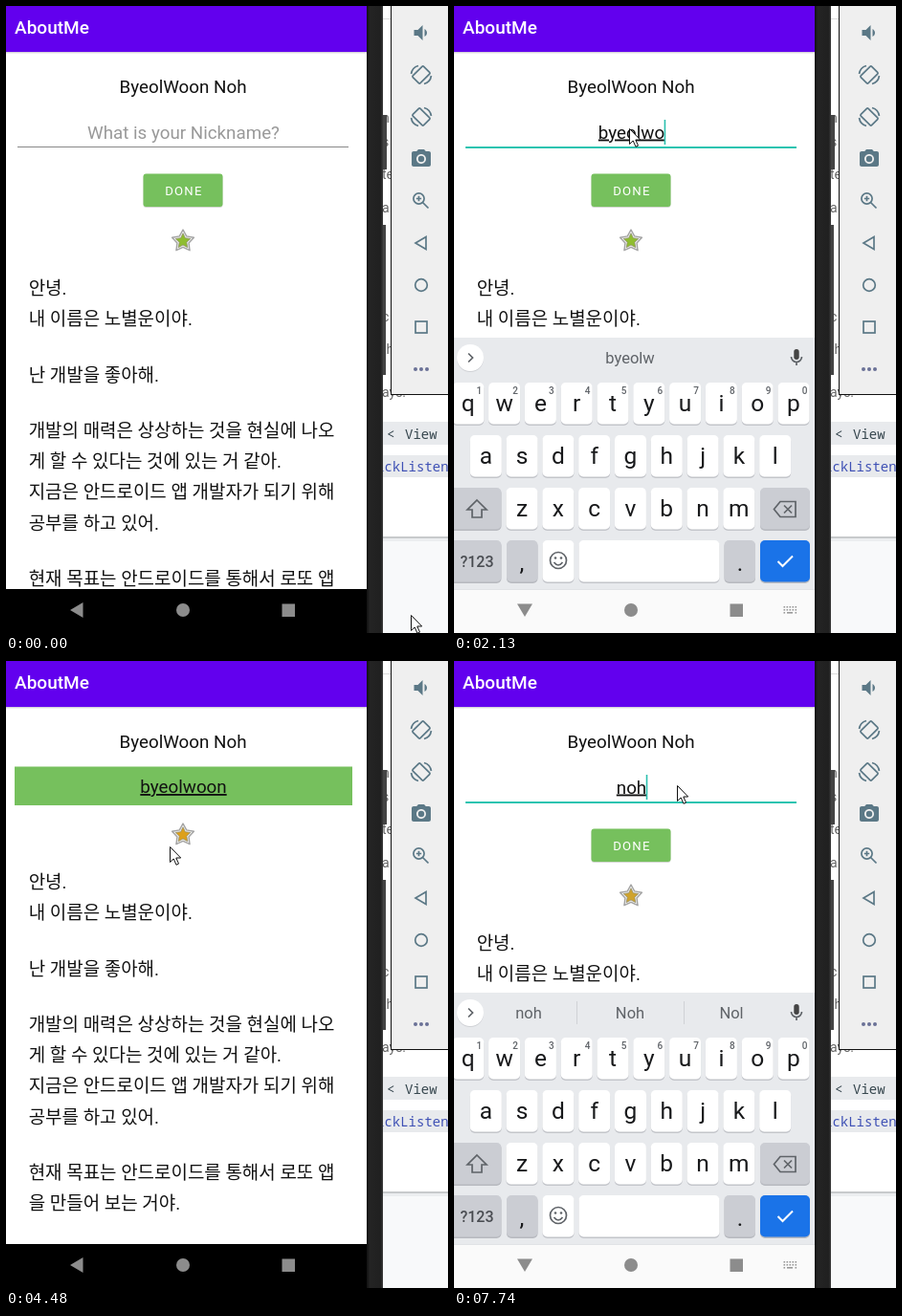
An HTML page that plays this animation: 462 by 656 pixels, repeating every 8 s.

```html
<!DOCTYPE html>
<html lang="ko">
<head>
<meta charset="utf-8">
<title>AboutMe</title>
<style>
  html, body { margin: 0; width: 100%; height: 100%; overflow: hidden; background: #fff; }
  svg { display: block; width: 462px; height: 656px; }
  text { font: 18.8px Roboto, 'Noto Sans CJK KR', 'Noto Sans CJK', sans-serif; fill: #111; white-space: pre; }
  .mid { text-anchor: middle; }
  .body { font-size: 18.95px; }
  .composing { text-decoration: underline; text-decoration-thickness: 1px; text-decoration-skip-ink: none; }
  .key { font-size: 24.5px; fill: #18191b; }
  .small { font-size: 10px; font-weight: 500; fill: #5f6368; }
  .word { font-size: 16.5px; fill: #5f6368; }
  .code { font: 500 14px 'Noto Sans Mono', monospace; fill: #37474f; }
  .doc { font-size: 14px; fill: #666; }
  .line { fill: none; stroke: #5f6368; stroke-width: 1.7; }
  .tool { fill: #5b7886; }
  .toolLine { fill: none; stroke: #5b7886; stroke-width: 1.7; }
</style>
</head>
<body>
<svg id="stage" viewBox="0 0 462 656"></svg>
<script>
const LOOP = 8000;
const NICK = 'byeolwoon';
const part = n => NICK.slice(0, n);

// Timelines: [start in ms, value]
const TEXT = [
  [0, ''], [1570, part(1)], [1700, part(2)], [1840, part(3)], [1900, part(4)], [1970, part(5)],
  [2060, part(6)], [2130, part(7)], [2260, part(8)], [2330, NICK],
  [6060, part(8)], [6340, part(7)], [6430, part(6)], [6510, part(5)], [6590, part(3)],
  [6670, part(1)], [6750, ''], [7210, 'n'], [7540, 'no'], [7740, 'noh']
];
const WORDS = [
  [0, null], [1640, ['b', 'B', 'by']], [1770, ['by', 'By', 'bye']], [1900, [part(4)]],
  [1970, [part(5)]], [2130, [part(6)]], [2330, [part(7)]], [2530, [NICK]],
  [6430, [part(7)]], [6510, [part(5)]], [6590, [part(3)]], [6670, [part(1)]], [6750, null],
  [7280, ['n', 'N', 'no']], [7540, ['no', 'No', 'not']], [7740, ['noh', 'Noh', 'Nol']]
];
const CARET = [
  [0, 0], [900, 1], [1310, 0], [1570, 1], [2990, 0], [3490, 1], [3940, 0],
  [5310, .6], [5450, 1], [5930, 0], [6060, 1]
];
const POINTER = [
  [70, 423, 637], [780, 183, 128], [3360, 183, 128], [3600, 165, 200],
  [4360, 165, 200], [5040, 233, 130], [LOOP, 233, 130]
];

const clamp = v => Math.max(0, Math.min(1, v));
const at = (list, t) => list.filter(e => e[0] <= t).pop()[1];
const smooth = p => p * p * (3 - 2 * p);

const rect = (x, y, w, h, fill, more = '') =>
  `<rect x="${x}" y="${y}" width="${w}" height="${h}" fill="${fill}" ${more}/>`;
const text = (x, y, s, cls = '', more = '') => `<text x="${x}" y="${y}" class="${cls}" ${more}>${s}</text>`;
const path = (d, cls = 'line', more = '') => `<path d="${d}" class="${cls}" ${more}/>`;
const group = (id, body, more = '') => `<g id="${id}" ${more}>${body}</g>`;
const icon = (x, y, scale, d) =>
  path(d, 'tool', `transform="translate(${x} ${y}) scale(${scale}) translate(-12 -12)"`);

function starPoints(outer, inner) {
  return Array.from({ length: 10 }, (_, i) => {
    const r = i % 2 ? inner : outer, a = i * Math.PI / 5 - Math.PI / 2;
    return `${(r * Math.cos(a)).toFixed(2)},${(r * Math.sin(a)).toFixed(2)}`;
  }).join(' ');
}

function documentPage() {
  const snippets = [[122, 'n'], [147, 's'], [181, 'te'], [216, 'a'], [330, 'c'], [364, 'th'], [409, 'ays.']];
  return rect(394, 0, 68, 556, '#fff') + rect(394, 13, 10, 1, '#ddd')
    + rect(394, 556, 68, 100, '#f8f9fa') + rect(394, 555, 68, 2, '#c8cacc') + rect(394, 557, 68, 3, '#eceef0')
    + snippets.map(([y, s]) => text(393, y, s, 'doc')).join('')
    + rect(394, 435, 68, 24, '#e8eaed') + text(398, 452.5, '&lt;', 'code') + text(417, 452.5, 'View', 'code')
    + rect(394, 470, 68, 23, '#e8eaed') + text(387, 486.5, 'ickListen', 'code', 'style="fill:#3f51b5"');
}

function emulatorPanel() {
  const rotate = flip => `<g transform="translate(434 ${flip > 0 ? 72 : 116}) scale(${flip} 1)" class="toolLine">
    <rect x="-5.5" y="-8" width="11" height="16" rx="1.2" transform="rotate(45)"/>
    <path d="M-10.5-1A10.5 10.5 0 0 1-3-9.5M10.5 1A10.5 10.5 0 0 1 3 9.5"/></g>`;
  return rect(402, -2, 62, 409, '#111') + rect(403, -2, 60, 408, '#efefef')
    + icon(433.5, 28, 1, 'M18.5 12c0-1.77-1.02-3.29-2.5-4.03v8.05c1.48-.73 2.5-2.25 2.5-4.02zM5 9v6h4l5 5V4L9 9H5z')
    + rotate(1) + rotate(-1)
    + icon(434, 160, 1, 'M9 2L7.17 4H4c-1.1 0-2 .9-2 2v12c0 1.1.9 2 2 2h16c1.1 0 2-.9 2-2V6c0-1.1-.9-2-2-2h-3.17L15 2H9zm3 15c-2.76 0-5-2.24-5-5s2.24-5 5-5 5 2.24 5 5-2.24 5-5 5z')
    + '<circle cx="434" cy="160" r="3.2" class="tool"/>'
    + '<circle cx="431.5" cy="201.5" r="5.6" class="toolLine"/>'
    + path('M435.5 205.5L441.5 211.5M428.8 201.5H434.2M431.5 198.8V204.2', 'toolLine')
    + path('M428 248L439 241.5V254.5Z', 'toolLine')
    + '<circle cx="434" cy="292" r="6.3" class="toolLine"/>'
    + '<rect x="428" y="330" width="12" height="12" class="toolLine"/>'
    + [428, 434, 440].map(x => `<circle cx="${x}" cy="380" r="2" fill="#6a7196"/>`).join('');
}

function appContent() {
  const body = [
    [301, '안녕.'], [333, '내 이름은 노별운이야.'], [392, '난 개발을 좋아해.'],
    [450, '개발의 매력은 상상하는 것을 현실에 나오'], [482, '게 할 수 있다는 것에 있는 거 같아.'],
    [514, '지금은 안드로이드 앱 개발자가 되기 위해'], [547, '공부를 하고 있어.'],
    [605, '현재 목표는 안드로이드를 통해서 로또 앱'], [637, '을 만들어 보는 거야.']
  ];
  const star = `<g transform="translate(185 246)" stroke-linejoin="round">
    <polygon points="${starPoints(12, 6.4)}" fill="#f0f0f0" stroke="#a4a4a4" stroke-width="1.4"/>
    <polygon id="star" points="${starPoints(8.2, 4)}" stroke="#8b8a6c" stroke-width=".7"/></g>`;
  return rect(0, 0, 377, 656, '#fff') + rect(0, 48, 377, 1, '#d5d1dc') + rect(0, 49, 377, 1, '#f1f1f1')
    + rect(0, 0, 377, 48, '#6200ee')
    + text(9, 29, 'AboutMe', '', 'style="fill:#fff;font-weight:500;font-size:19px"')
    + text(185, 90.5, 'ByeolWoon Noh', 'mid')
    + group('editor',
        text(185.5, 138.5, 'What is your Nickname?', 'mid', 'id="hint" style="fill:#999"')
        + text(185.5, 138.5, '', 'mid composing', 'id="field"')
        + rect(12, 147, 346, 1, '#888', 'id="fieldLine"')
        + rect(0, 119, 1.6, 26, '#2bbfae', 'id="caret"')
        + rect(143.5, 176.5, 83, 34.5, '#d5d8d3', 'rx="3"')
        + rect(143.5, 175.5, 83, 34.5, '#76c05d', 'rx="3" id="button"')
        + text(166.3, 197.5, 'DONE', '', 'style="fill:#fff;font-size:13.2px;letter-spacing:1.17px"'))
    + group('result', rect(9, 110.5, 353, 40.5, '#76c05d') + text(185.5, 138, NICK, 'mid composing'))
    + group('below', star + body.map(([y, s]) => text(23.7, y + 1, s, 'body')).join(''));
}

function key(center, top, width, label, hint = '') {
  return rect(center - width / 2, top + 1, width, 44, '#c3c5ca', 'rx="5"')
    + rect(center - width / 2, top, width, 43.5, '#fff', 'rx="5"')
    + text(center, top + 30, label, 'key mid') + text(center + 11.5, top + 12, hint, 'small mid');
}
const greyKey = (x, top, w, fill = '#cbcdd3') =>
  rect(x, top + 1, w, 44, '#b7b9bf', 'rx="5"') + rect(x, top, w, 43.5, fill, 'rx="5"');

function keyboard() {
  const row = (letters, first, top, hints = '') =>
    [...letters].map((c, i) => key(first + i * 37.8, top, 33, c, hints[i])).join('');
  const mic = '<rect x="355.3" y="359" width="5.4" height="11" rx="2.7" fill="#444"/>'
    + path('M352.5 367A5.5 5.5 0 0 0 363.5 367M358 372.5V376');
  const tools = '<circle cx="66.5" cy="366.5" r="5" class="line"/>' + path('M70 370L76 376')
    + path('M131 368V363Q131 361 129 361H118Q116 361 116 363V373Q116 375 118 375H124ZM124 375V370Q124 368 126 368H131M119.5 369Q121 372 124 371')
    + '<circle cx="120.5" cy="365.5" r="1" fill="#5f6368"/><circle cx="126.5" cy="365.5" r="1" fill="#5f6368"/>'
    + text(178, 372, 'GIF', 'mid', 'style="font-size:12.5px;font-weight:700;fill:#5f6368"')
    + path('M230 361.5H227.5V376H241V361.5H238.5M231 360H237.5V364H231ZM230.5 368H238M230.5 372H236')
    + rect(267.5, 358, 1, 20, '#d0d2d6')
    + [296, 302, 308].map(x => `<circle cx="${x}" cy="368" r="1.8" fill="#5f6368"/>`).join('');
  const words = [78, 184, 290].map((x, i) => text(x, 374, '', 'word mid', `id="word${i}"`)).join('')
    + group('dividers', rect(128, 356, 1, 24, '#d0d2d6') + rect(240, 356, 1, 24, '#d0d2d6'));
  return rect(0, 347, 377, 265, '#e8eaed')
    + '<circle cx="17" cy="369" r="14" fill="#cfd1d5"/><circle cx="17" cy="368" r="14" fill="#fff"/>'
    + path('M-2-4.5L2.5 0L-2 4.5', 'line', 'id="chevron"')
    + group('tools', tools) + group('words', words) + mic
    + row('qwertyuiop', 14.8, 394, '1234567890') + row('asdfghjkl', 33.3, 449)
    + greyKey(-5, 504, 54.5) + path('M24 517L34 527H29V535H19V527H14Z') + row('zxcvbnm', 71, 504)
    + greyKey(320, 504, 52)
    + path('M341 518.5H357V534.5H341L334.5 526.5ZM345 522.5L353 530.5M353 522.5L345 530.5')
    + greyKey(-5, 559, 54.5) + text(24, 586.5, '?123', 'mid', 'style="font-size:16px;font-weight:500;fill:#4a4d52"')
    + greyKey(55, 559, 32.5) + text(71, 591, ',', 'key mid')
    + key(109, 559, 33, '') + '<circle cx="109" cy="580" r="8.5" class="line"/>'
    + '<circle cx="106" cy="577.5" r="1.3" fill="#5f6368"/><circle cx="112" cy="577.5" r="1.3" fill="#5f6368"/>'
    + path('M104.5 582Q109 588 113.5 582')
    + key(204, 559, 147, '')
    + greyKey(282.5, 559, 32.5) + text(299, 591, '.', 'key mid')
    + greyKey(320, 559, 52, '#1a73e8')
    + path('M338.5 581L343.5 586L354 575.5', 'line', 'style="stroke:#fff;stroke-width:2"');
}

function navigation() {
  const keys = [0, 1, 2].flatMap(r => [0, 1, 2, 3, 4].map(c =>
    r === 2 && c % 4 ? '' : rect(344.5 + c * 3, 628 + r * 3, 1.6, 1.6, '#999'))).join('');
  return rect(0, 610, 377, 46, '#000')
    + group('navLight', rect(0, 610, 377, 46, '#fafafa') + rect(0, 610, 377, 1, '#e1e3e6'))
    + '<path id="back" d="M-7 0L6.5-8V8Z" fill="#8c8c8c"/>'
    + '<circle cx="185" cy="632" r="7" fill="#8c8c8c"/>' + rect(288.5, 625.5, 13.5, 13.5, '#8c8c8c')
    + group('imeIcon', keys + rect(348, 634, 6, 1.6, '#999'));
}

const stage = document.getElementById('stage');
stage.innerHTML = `<defs><clipPath id="screen"><rect width="377" height="656"/></clipPath>
  <linearGradient id="bezel"><stop stop-color="#111"/><stop offset=".2" stop-color="#242424"/>
  <stop offset=".85" stop-color="#202020"/><stop offset="1" stop-color="#3a3a3a"/></linearGradient></defs>`
  + documentPage()
  + rect(394, 114, 4, 57, '#444') + rect(394, 229, 3, 157, '#444')
  + rect(377, 0, 17, 656, 'url(#bezel)') + emulatorPanel()
  + `<g clip-path="url(#screen)">${appContent()}${group('keyboard', keyboard())}${navigation()}</g>`
  + '<path id="pointer" d="M0 0V16L3.7 12.5L6.5 18.8L9 17.6L6.3 11.5H11.2Z" fill="#fff" stroke="#111"/>';

const ui = {};
stage.querySelectorAll('[id]').forEach(el => ui[el.id] = el);
const show = (el, on) => el.setAttribute('display', on ? 'inline' : 'none');
const set = (el, attrs) => Object.entries(attrs).forEach(([k, v]) => el.setAttribute(k, v));

function pointerAt(t) {
  const next = POINTER.findIndex(p => p[0] > t);
  if (next === 0) return POINTER[0].slice(1);
  const [t0, x0, y0] = POINTER[next - 1], [t1, x1, y1] = POINTER[next];
  const p = smooth((t - t0) / (t1 - t0));
  return [x0 + (x1 - x0) * p, y0 + (y1 - y0) * p];
}

function drawKeyboard(t) {
  const opened = t < 5000 ? 900 : 5430;
  const closing = t >= 4020 && t < 5000 ? clamp((t - 4020) / 180) : 0;
  const rise = clamp((t - opened) / 273);
  const offset = closing ? 263 * closing ** 2 : 263 * (1 - rise) ** 3;
  const turn = closing ? 1 - closing : clamp((t - opened) / 370);
  show(ui.keyboard, rise > 0 && closing < 1);
  ui.keyboard.setAttribute('transform', `translate(0 ${Math.round(offset)})`);
  ui.navLight.setAttribute('opacity', closing ? 1 - closing : clamp(rise * 2.5));
  ui.back.setAttribute('transform', `translate(74 632) rotate(${-90 * turn})`);
  show(ui.imeIcon, rise > .5 && !(t >= 3940 && t < 5240));

  const words = at(WORDS, t);
  show(ui.tools, !words);
  show(ui.words, words);
  ui.chevron.setAttribute('transform', `translate(17 368) scale(${words ? 1 : -1} 1)`);
  if (!words) return;
  show(ui.dividers, words.length > 1);
  const slots = words.length > 1 ? words : ['', words[0], ''];
  slots.forEach((w, i) => ui['word' + i].textContent = w);
}

function draw(t) {
  const value = at(TEXT, t), focused = t >= 830, done = t >= 3940 && t < 5240;
  show(ui.editor, !done);
  show(ui.result, done);
  ui.below.setAttribute('transform', `translate(0 ${done ? -64 : 0})`);
  ui.star.setAttribute('fill', t < 3940 ? '#8fbd30' : done ? '#dda01c' : '#cfa32e');
  ui.button.setAttribute('fill', t >= 3870 && t < 3940 ? '#8ccb77' : '#76c05d');

  show(ui.hint, !value);
  ui.field.textContent = value;
  set(ui.fieldLine, focused ? { height: 2, fill: '#2bc4b0' } : { height: 1, fill: '#888' });
  const width = value && !done ? ui.field.getComputedTextLength() : 0;
  set(ui.caret, { x: 185 + width / 2, opacity: at(CARET, t) });

  drawKeyboard(t);
  ui.pointer.setAttribute('transform', `translate(${pointerAt(t).map(v => Math.round(v) + .5)})`);
}

const start = performance.now();
function tick() {
  draw((performance.now() - start) % LOOP);
  requestAnimationFrame(tick);
}
tick();
</script>
</body>
</html>
```
